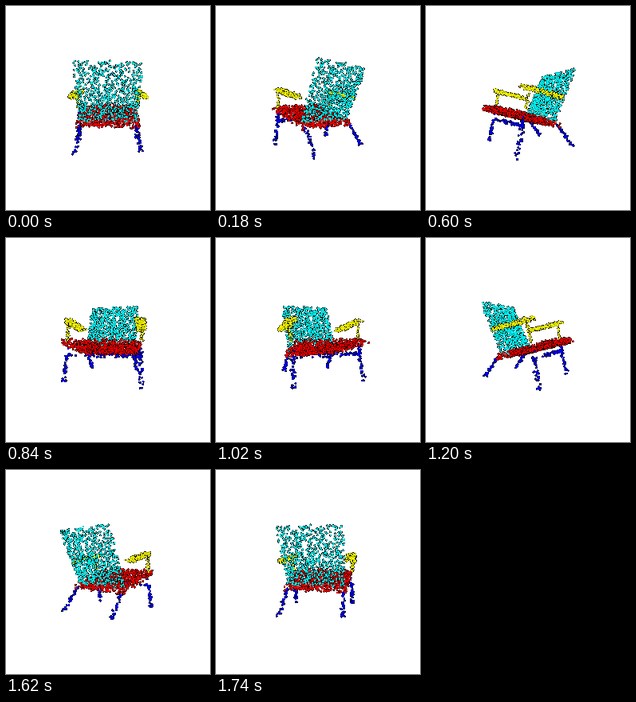
A matplotlib script for the animation above (1.8 s loop, 256x256 px).

```python
import numpy as np
import matplotlib.pyplot as plt
from matplotlib.animation import FuncAnimation

SIZE, FRAMES, INTERVAL = 256, 30, 60
DIST = 215               # camera distance in stage pixels
TILT = np.radians(2)     # camera elevation
BALL, CORE = 1.5, 1.1    # outer radius, coloured radius
BULGE = 24               # lets bright centres win over dark rims nearby

CYAN, RED, YELLOW, BLUE = (0, 255, 255), (255, 0, 0), (255, 255, 0), (0, 0, 255)

rng = np.random.default_rng(7)
parts, colors = [], []


def add(points, color):
    parts.append(points)
    colors.append(np.tile(color, (len(points), 1)))


def rod(a, b, n, spread, color):
    """Scatter n points along a bar from a to b."""
    t = rng.random((n, 1))
    jitter = rng.uniform(-1, 1, (n, 3)) * spread
    add(np.array(a) * (1 - t) + np.array(b) * t + jitter, color)


def slab(front, back, n, thick, color):
    """Scatter n points over a panel; each end is (half width, y, z)."""
    t = rng.random(n)
    w, y, z = (f + (b - f) * t for f, b in zip(front, back))
    x = w * rng.uniform(-1, 1, n)
    add(np.column_stack([x, y, z + rng.uniform(-thick, thick, n)]), color)


# x: sideways, y: towards the chair's front, z: up
slab((35, -46, 47), (34, -15, -16), 720, 2, CYAN)
slab((42, 47, 0), (36, -22, -19), 900, 3.5, RED)
for side in (-1, 1):
    rod((side * 40.5, 30, 23), (side * 40.5, -20, 13), 160, (5.5, 1.5, 2), YELLOW)
    rod((side * 42, 23, 22), (side * 42, 27, -1), 18, (1.5, 1, 1), YELLOW)
    rod((side * 41, 28, -7), (side * 42, 37, -47), 40, (2, 2, 1), BLUE)
    rod((side * 32, -21, -19), (side * 34, -42, -46), 34, (2, 2, 1), BLUE)
rod((-41, 29, -16), (41, 29, -16), 48, (1, 1, 2), BLUE)

cloud = np.vstack(parts)
rgb = np.vstack(colors)
offsets = np.stack(np.meshgrid(range(-2, 3), range(-2, 3)), -1).reshape(-1, 2)


def project(angle):
    x, y, z = cloud.T
    c, s = np.cos(angle), np.sin(angle)
    side, away = x * c - y * s, x * s + y * c
    depth = away * np.cos(TILT) - z * np.sin(TILT)
    up = z * np.cos(TILT) + away * np.sin(TILT)
    scale = DIST / (DIST + depth)
    center = np.column_stack([side, -up]) * scale[:, None] + SIZE / 2
    return center, depth


def render(angle):
    """Draw every point as a small dark-rimmed ball, far to near."""
    center, depth = project(angle)
    pixel = np.floor(center).astype(int)[:, None] + offsets
    r = np.hypot(*np.moveaxis(pixel + 0.5 - center[:, None], 2, 0))
    near = BULGE * np.sqrt(np.clip(1 - (r / BALL)**2, 0, None)) - depth[:, None]
    light = np.where(r < CORE, np.clip(1.3 - 0.65 * r, 0, 1), 0)
    shade = (rgb[:, None] * light[..., None]).astype(np.uint8)

    hit = r < BALL
    order = np.argsort(near[hit], kind="stable")
    px, py = pixel[hit][order].T
    image = np.full((SIZE, SIZE, 3), 255, np.uint8)
    image[py, px] = shade[hit][order]
    return image


fig = plt.figure(figsize=(2.56, 2.56), dpi=100, facecolor="white")
ax = fig.add_axes([0, 0, 1, 1])
ax.axis("off")
view = ax.imshow(render(0), interpolation="nearest", aspect="auto")


def update(i):
    view.set_data(render(2 * np.pi * i / FRAMES))
    return (view,)


anim = FuncAnimation(fig, update, frames=FRAMES, interval=INTERVAL,
                     repeat=True, repeat_delay=0, blit=False)
plt.show()
```
